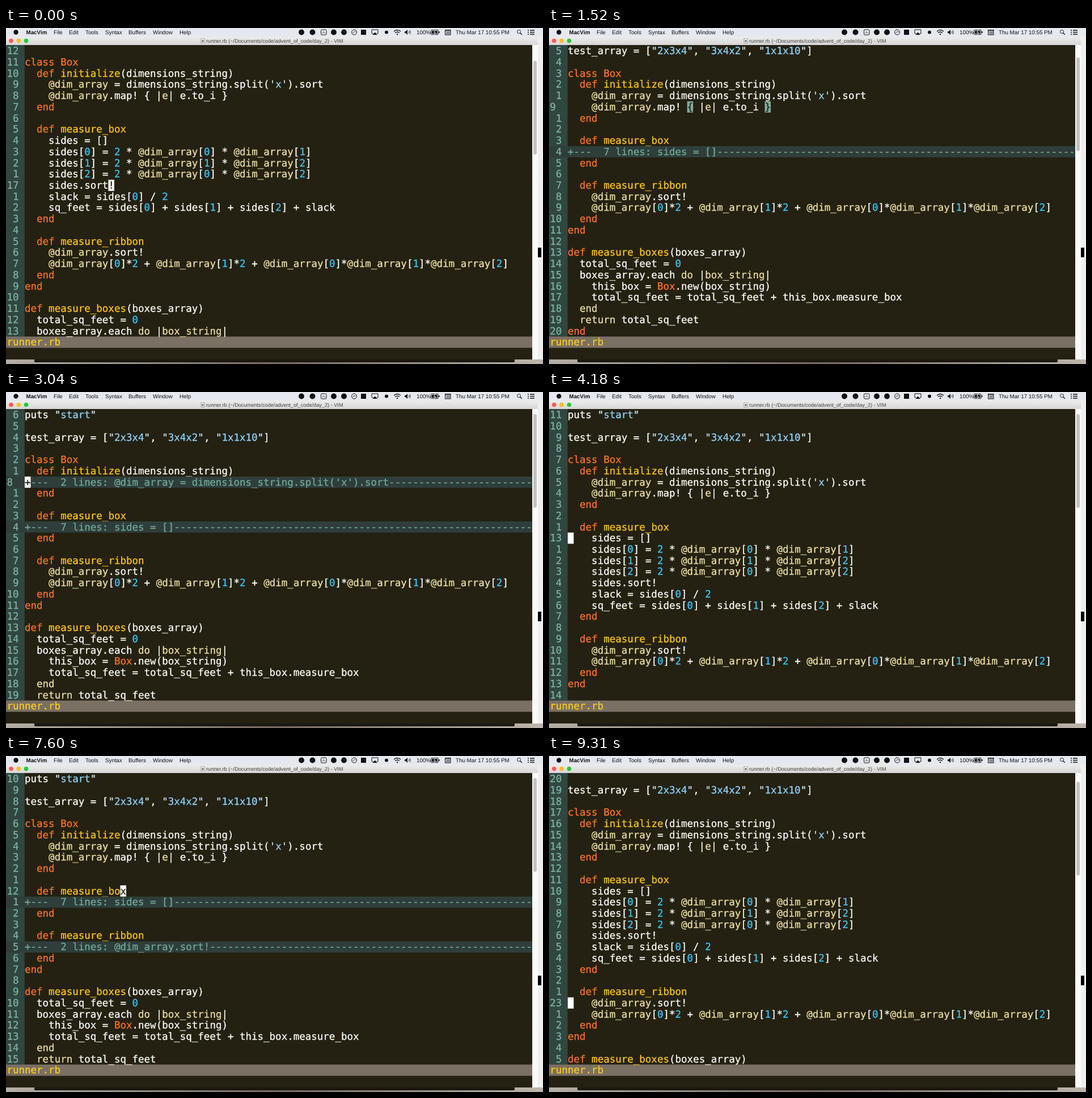
These frames come from a looping animation (947 px wide and 592 px high, 9500 ms). An HTML page:

```html
<!DOCTYPE html>
<html lang="en">
<head>
<meta charset="utf-8">
<title>Folding methods in an editor</title>
<style>
  html, body { margin: 0; width: 100%; height: 100%; overflow: hidden; background: #242112; }
  svg { display: block; width: 100vw; height: 100vh; }
  text { white-space: pre; text-rendering: geometricPrecision; }
  .ui { font-family: "Liberation Sans", Arial, sans-serif; font-size: 9.8px; fill: #111; }
  .code { font-family: "DejaVu Sans Mono", Menlo, monospace; font-size: 17.49px; stroke-width: .3px; }
</style>
</head>
<body>
<svg viewBox="0 0 947 592" preserveAspectRatio="none">
  <defs>
    <linearGradient id="bar" x1="0" y1="0" x2="0" y2="1">
      <stop offset="0" stop-color="#ececec"/><stop offset="1" stop-color="#d6d6d6"/>
    </linearGradient>
    <linearGradient id="desk">
      <stop offset="0" stop-color="#b5aea4"/><stop offset=".5" stop-color="#756b60"/><stop offset="1" stop-color="#bdb5ab"/>
    </linearGradient>
  </defs>
  <rect width="947" height="592" fill="#efeeec"/>
  <rect y="584" width="947" height="8" fill="url(#desk)"/>
  <rect x="50" y="583" width="847" height="6" rx="2" fill="#1b1813"/>
  <rect x="938" y="387" width="6" height="17" fill="#000"/>

  <rect width="947" height="15" fill="#e5e8ee"/>
  <g id="menu" class="ui"></g>
  <g fill="none" stroke="#111">
    <g fill="#111" stroke="none">
      <circle cx="17.5" cy="7.5" r="4.2"/>
      <circle cx="521" cy="7.5" r="5"/>
      <circle cx="540.5" cy="7.5" r="5"/>
      <circle cx="578" cy="7.5" r="5"/>
      <circle cx="596" cy="7.5" r="5"/>
      <rect x="626" y="3" width="9" height="9"/>
      <circle cx="671" cy="7.5" r="3"/>
      <path d="M646 12 L650.5 7.5 L655 12Z"/>
      <path d="M703 6h2l3-3v9l-3-3h-2z"/>
      <circle cx="690" cy="11" r="1.2"/>
      <rect x="751" y="5" width="9.5" height="5"/>
      <rect x="763" y="6" width="1.5" height="3"/>
    </g>
    <rect x="555.5" y="3" width="9.5" height="9" rx="1.5"/>
    <path d="M558 9.5l2-3 3 3" stroke-width=".8"/>
    <circle cx="614" cy="7.5" r="4.5"/>
    <path d="M611 9q3-4 6-2" stroke-width=".8"/>
    <path d="M647 9.5h-2v-6.500h11v6.500h-2"/>
    <path d="M684 6q6-5 12 0M686 8.500q4-3 8 0" stroke-width="1.4"/>
    <path d="M710 5.500q1.500 2 0 4M712 4q2.500 3.500 0 7" stroke-width=".9"/>
    <rect x="749.500" y="3.500" width="12.500" height="8" rx="1"/>
    <path d="M757 3l-2.500 5h3l-2 4" stroke="#e5e8ee"/>
    <rect x="774.500" y="3.500" width="9.500" height="8.500"/>
    <path d="M774.500 5h9.500M776 7.500h7M776 10h7" stroke-width="1.2"/>
    <circle cx="904.500" cy="6.500" r="3"/>
    <path d="M906.800 8.800l3 3" stroke-width="1.4"/>
    <path d="M920 4h2M924 4h8M920 7.500h2M924 7.500h8M920 11h2M924 11h8" stroke-width="1.3"/>
  </g>

  <rect y="15" width="938" height="15.500" fill="url(#bar)"/>
  <circle cx="9" cy="22.500" r="3.800" fill="#fb5b54"/>
  <circle cx="22.300" cy="22.500" r="3.800" fill="#f8bb2e"/>
  <circle cx="35.500" cy="22.500" r="3.800" fill="#2ac43f"/>
  <rect x="344" y="19" width="6" height="7.500" fill="#fff" stroke="#777" stroke-width=".7"/>
  <path d="M345.500 21.500h3v3h-3z" fill="#555"/>
  <text class="ui" x="353" y="25.800" style="font-size:9.16px;fill:#444">runner.rb (~/Documents/code/advent_of_code/day_2) - VIM</text>

  <rect y="30" width="928" height="554" fill="#242112"/>
  <rect x="928" y="30" width="10" height="554" fill="#fafafa"/>
  <rect id="thumb" x="930" width="6" height="165" rx="3" fill="#c1c1c1"/>
  <rect y="30" width="32.800" height="513.600" fill="#304640"/>
  <rect y="543.600" width="928" height="19.900" fill="#7b7064"/>
  <g id="code" class="code"></g>
  <text class="code" x="1.400" y="559.200" fill="#ffcf18" stroke="#ffcf18">runner.rb</text>
</svg>
<script>
(() => {
const LOOP = 9500, ROWS = 26, MARGIN = 5, COLS = 85;
const CW = 10.53, RH = 19.74, TOP = 30.5, LEFT = 33, GUTTER = 1.4;
const C = {
  text: '#fdfdf8', key: '#ff7420', name: '#ffc60f', ivar: '#efe0a2', num: '#3cc6fb',
  str: '#8fd3fb', quote: '#d3e8f2', line: '#7fb2a2', fold: '#72aa99', foldBg: '#2f3e3b',
  match: '#84a99b', dark: '#242112'
};

const SOURCE = `
puts "start"

test_array = ["2x3x4", "3x4x2", "1x1x10"]

class Box
  def initialize(dimensions_string)
    @dim_array = dimensions_string.split('x').sort
    @dim_array.map! { |e| e.to_i }
  end

  def measure_box
    sides = []
    sides[0] = 2 * @dim_array[0] * @dim_array[1]
    sides[1] = 2 * @dim_array[1] * @dim_array[2]
    sides[2] = 2 * @dim_array[0] * @dim_array[2]
    sides.sort!
    slack = sides[0] / 2
    sq_feet = sides[0] + sides[1] + sides[2] + slack
  end

  def measure_ribbon
    @dim_array.sort!
    @dim_array[0]*2 + @dim_array[1]*2 + @dim_array[0]*@dim_array[1]*@dim_array[2]
  end
end

def measure_boxes(boxes_array)
  total_sq_feet = 0
  boxes_array.each do |box_string|
    this_box = Box.new(box_string)
    total_sq_feet = total_sq_feet + this_box.measure_box
  end
  return total_sq_feet
end
`.split('\n');
const lineAt = n => SOURCE[n - 1] || '';
const BLOCK_END = 33;

// Later rules paint over earlier ones.
const RULES = [
  [/\b\d+/g, C.num],
  [/\b(?:class|def|end|Box)\b/g, C.key],
  [/(?<=def )\w+/g, C.name],
  [/@\w+|\b(?:do|return)\b|(?<=\|)\w+(?=\|)/g, C.ivar],
  [/(["']).*?\1/g, C.str],
  [/["']/g, C.quote]
];

const FOLDS = { i: [8, 9], b: [13, 19], r: [23, 24] };

// time, cursor line, closed folds, 1 = cursor stays in the first column
const STEPS = [
  [0, 17, ''], [570, 13, 'b'], [950, 12, 'b'], [1140, 11, 'b'], [1330, 10, 'b'],
  [1520, 9, 'b'], [1710, 8, 'b'], [1900, 7, 'b'], [2280, 8, 'b'], [2660, 8, 'ib'],
  [3230, 8, 'b', 1], [3420, 10, 'b'], [3610, 11, 'b'], [3800, 12, 'b'], [3990, 13, 'b'],
  [4180, 13, '', 1], [4560, 13, 'b'], [4940, 20, 'b'], [5130, 21, 'b'], [5320, 22, 'b'],
  [5510, 23, 'b'], [6270, 23, 'br'], [6650, 22, 'br'], [6840, 21, 'br'], [7030, 20, 'br'],
  [7220, 13, 'br'], [7410, 12, 'br'], [7790, 13, 'br'], [7980, 13, 'r', 1], [8170, 16, 'r'],
  [8360, 18, 'r'], [8550, 20, 'r'], [8740, 21, 'r'], [8930, 22, 'r'], [9120, 23, 'r'],
  [9310, 23, '', 1]
];

const $ = id => document.getElementById(id);
function add(parent, tag, attrs, text) {
  const el = document.createElementNS('http://www.w3.org/2000/svg', tag);
  for (const k in attrs) el.setAttribute(k, attrs[k]);
  if (text) el.textContent = text;
  return parent.appendChild(el);
}

const foldAt = (closed, n) => [...closed].map(k => FOLDS[k]).find(f => f[0] === n);

function visibleLines(closed) {
  const list = [];
  for (let n = 1; n <= 60; n++) {
    list.push(n);
    const fold = foldAt(closed, n);
    if (fold) n = fold[1];
  }
  return list;
}

// Scroll only as far as needed to keep the margin around the cursor.
let topLine = 5;
const states = STEPS.map(([time, cursor, closed, home]) => {
  const lines = visibleLines(closed);
  const at = lines.indexOf(cursor);
  const low = at + MARGIN - ROWS + 1, high = Math.max(0, at - MARGIN);
  const first = Math.max(low, Math.min(high, lines.indexOf(topLine)));
  topLine = lines[first];
  return { time, cursor, closed, home, topLine, at: at - first, rows: lines.slice(first, first + ROWS) };
});

const code = $('code');
const rowY = r => TOP + r * RH;
const put = (x, r, s, fill) => add(code, 'text', { x, y: rowY(r) + 15.6, fill, stroke: fill }, s);

function cell(r, col, ch, bg) {
  add(code, 'rect', { x: LEFT + col * CW, y: rowY(r), width: CW, height: RH, fill: bg });
  if (ch && ch !== ' ') put(LEFT + col * CW, r, ch, C.dark);
}

function drawCode(r, n) {
  const s = lineAt(n), paint = Array(s.length).fill(C.text);
  for (const [re, color] of RULES)
    for (const m of s.matchAll(re)) paint.fill(color, m.index, m.index + m[0].length);
  if (n === BLOCK_END) paint.fill(C.ivar);
  for (let a = 0, b; a < s.length; a = b) {
    for (b = a + 1; b < s.length && paint[b] === paint[a];) b++;
    const run = s.slice(a, b), pad = run.length - run.trimStart().length;
    if (run.trim()) put(LEFT + (a + pad) * CW, r, run.trim(), paint[a]);
  }
}

function drawFold(r, [from, to]) {
  add(code, 'rect', { x: 0, y: rowY(r), width: 928, height: RH, fill: C.foldBg });
  const label = `+---  ${to - from + 1} lines: ${lineAt(from).trim()}`;
  put(LEFT, r, label.padEnd(COLS, '-'), C.fold);
}

function drawCursor({ cursor, closed, home, at }) {
  const s = lineAt(cursor), folded = foldAt(closed, cursor);
  const col = folded || home ? 0 : Math.max(0, s.length - 1);
  const ch = folded ? '+' : s[col];
  const pair = { '}': '{', ')': '(', ']': '[' }[ch];
  if (pair) cell(at, s.lastIndexOf(pair), pair, C.match);
  cell(at, col, ch, pair ? C.match : '#fff');
}

function draw(state) {
  code.replaceChildren();
  state.rows.forEach((n, r) => {
    const fold = foldAt(state.closed, n);
    if (fold) drawFold(r, fold); else drawCode(r, n);
    const label = r === state.at ? String(n) : String(Math.abs(r - state.at)).padStart(2);
    const pad = label.length - label.trim().length;
    put(GUTTER + pad * CW, r, label.trim(), C.line);
  });
  drawCursor(state);
  $('thumb').setAttribute('y', 26.5 + 6.3 * state.topLine);
}

[[35.5, 'MacVim', 'bold'], [84, 'File'], [111, 'Edit'], [140, 'Tools'], [175, 'Syntax'],
 [216, 'Buffers'], [259, 'Window'], [306, 'Help'], [724, '100%'], [793, 'Thu Mar 17 10:55 PM']
].forEach(([x, s, weight = 'normal']) => add($('menu'), 'text', { x, y: 10.8, 'font-weight': weight }, s));

let shown;
const start = performance.now();
function tick() {
  const t = (performance.now() - start) % LOOP;
  const state = states.findLast(s => s.time <= t);
  if (state !== shown) draw(shown = state);
  requestAnimationFrame(tick);
}
tick();
})();
</script>
</body>
</html>
```
